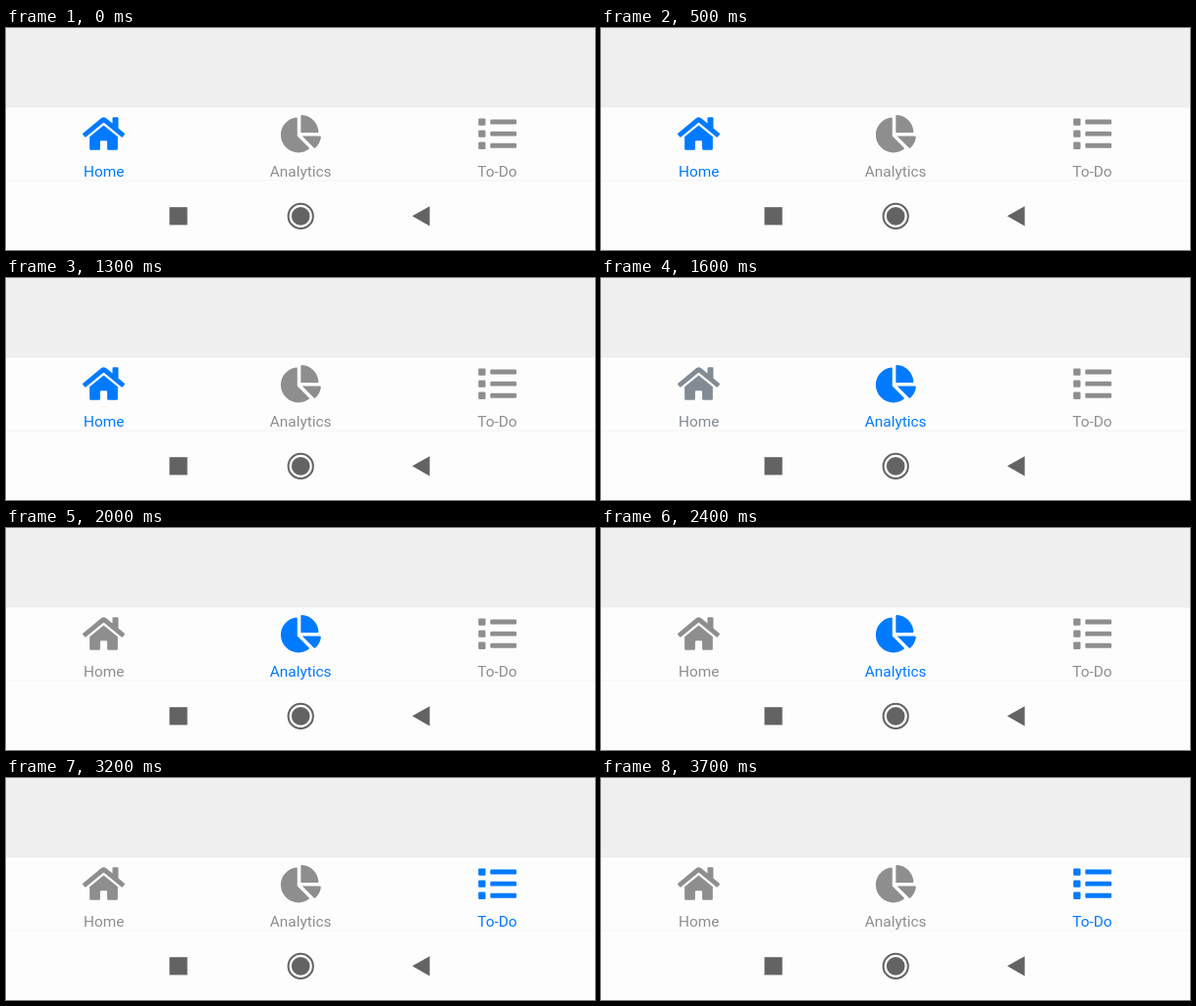
An HTML page that plays this animation: 600x227 px, repeating every 3800 ms.

```html
<!DOCTYPE html>
<html lang="en">
<head>
<meta charset="utf-8">
<title>Tab bar</title>
<style>
  html, body { margin: 0; width: 100%; height: 100%; overflow: hidden; background: #fdfdfd; }
  svg { display: block; width: 100%; height: 100%; }
  text { font: 15.4px Roboto, Arial, sans-serif; text-anchor: middle; }
</style>
</head>
<body>
<svg viewBox="0 0 600 227" preserveAspectRatio="none">
  <rect width="600" height="227" fill="#fdfdfd"/>
  <rect width="600" height="81" fill="#efefef"/>
  <rect y="80" width="600" height="1" fill="#ececec"/>
  <rect y="81" width="600" height="1" fill="#f8f8f8"/>
  <rect y="155.5" width="600" height="1" fill="#f3f3f3"/>

  <g class="tab">
    <path transform="translate(78 88.9) scale(.0747)" d="M280.4 148.3L96 300.1V464a16 16 0 0 0 16 16l112-.3a16 16 0 0 0 16-16V368a16 16 0 0 1 16-16h64a16 16 0 0 1 16 16v95.6a16 16 0 0 0 16 16L464 480a16 16 0 0 0 16-16V300L295.7 148.3a12.2 12.2 0 0 0-15.3 0zM571.6 251.5L488 182.6V44a12 12 0 0 0-12-12h-56a12 12 0 0 0-12 12v72.6L318.5 43a48 48 0 0 0-61 0L4.3 251.5a12 12 0 0 0-1.6 16.9l25.5 31A12 12 0 0 0 45.2 301l235.2-193.7a12.2 12.2 0 0 1 15.3 0L530.9 301a12 12 0 0 0 16.9-1.6l25.5-31a12 12 0 0 0-1.7-16.9z"/>
    <text x="99.7" y="151.6">Home</text>
  </g>
  <g class="tab">
    <path transform="translate(279.9 88.9) scale(.0752)" d="M527.8 288H290.5l158 158c6 6 16 6.5 22.2.7 38.7-36.5 65.3-85.6 73.1-140.9 1.4-9.4-6.5-17.8-16-17.8zM512 223.2C503.7 103.7 408.3 8.3 288.8 0 279.7-.6 272 7.1 272 16.2V240h223.8c9.1 0 16.8-7.7 16.2-16.8zM224 288V50.7c0-9.5-8.4-17.4-17.8-16C87 51.5-4.1 155.6.1 280.4 4.5 408.5 114.8 513.6 243 512c50.4-.6 97-16.9 135.3-44 7.9-5.6 8.4-17.3 1.6-24.1z"/>
    <text x="300.2" y="151.6">Analytics</text>
  </g>
  <g class="tab">
    <g id="list"></g>
    <text x="500.4" y="151.6">To-Do</text>
  </g>

  <g fill="#636363">
    <rect x="166.5" y="183.2" width="18.2" height="18.2"/>
    <circle cx="300.2" cy="192.4" r="9.3"/>
    <circle cx="300.2" cy="192.4" r="12.6" fill="none" stroke="#636363" stroke-width="2"/>
    <path d="M413.8 192.3L431.6 182.2V202.4z"/>
  </g>
</svg>
<script>
  const LOOP = 3800;
  const STARTS = [0, 1500, 2700];
  const GHOST = 300;
  const BLUE = '#007aff', GRAY = '#8e8e8f', FADING = '#828b94';
  const tabs = document.querySelectorAll('.tab');

  document.getElementById('list').innerHTML = [0, 1, 2].map(i => {
    const y = 92.4 + i * 12.1;
    return `<rect x="481.2" y="${y}" width="7.3" height="7.3" rx="1.2"/>` +
           `<rect x="493.3" y="${y + 1.2}" width="26.7" height="4.9" rx="1.2"/>`;
  }).join('');

  function draw(t) {
    const active = STARTS.filter(s => t >= s).length - 1;
    const fading = active > 0 && t - STARTS[active] < GHOST;
    tabs.forEach((tab, i) => {
      const color = i === active ? BLUE : fading && i === active - 1 ? FADING : GRAY;
      tab.setAttribute('fill', color);
    });
  }

  const begin = performance.now();
  function tick() {
    draw((performance.now() - begin) % LOOP);
    requestAnimationFrame(tick);
  }
  tick();
</script>
</body>
</html>
```
